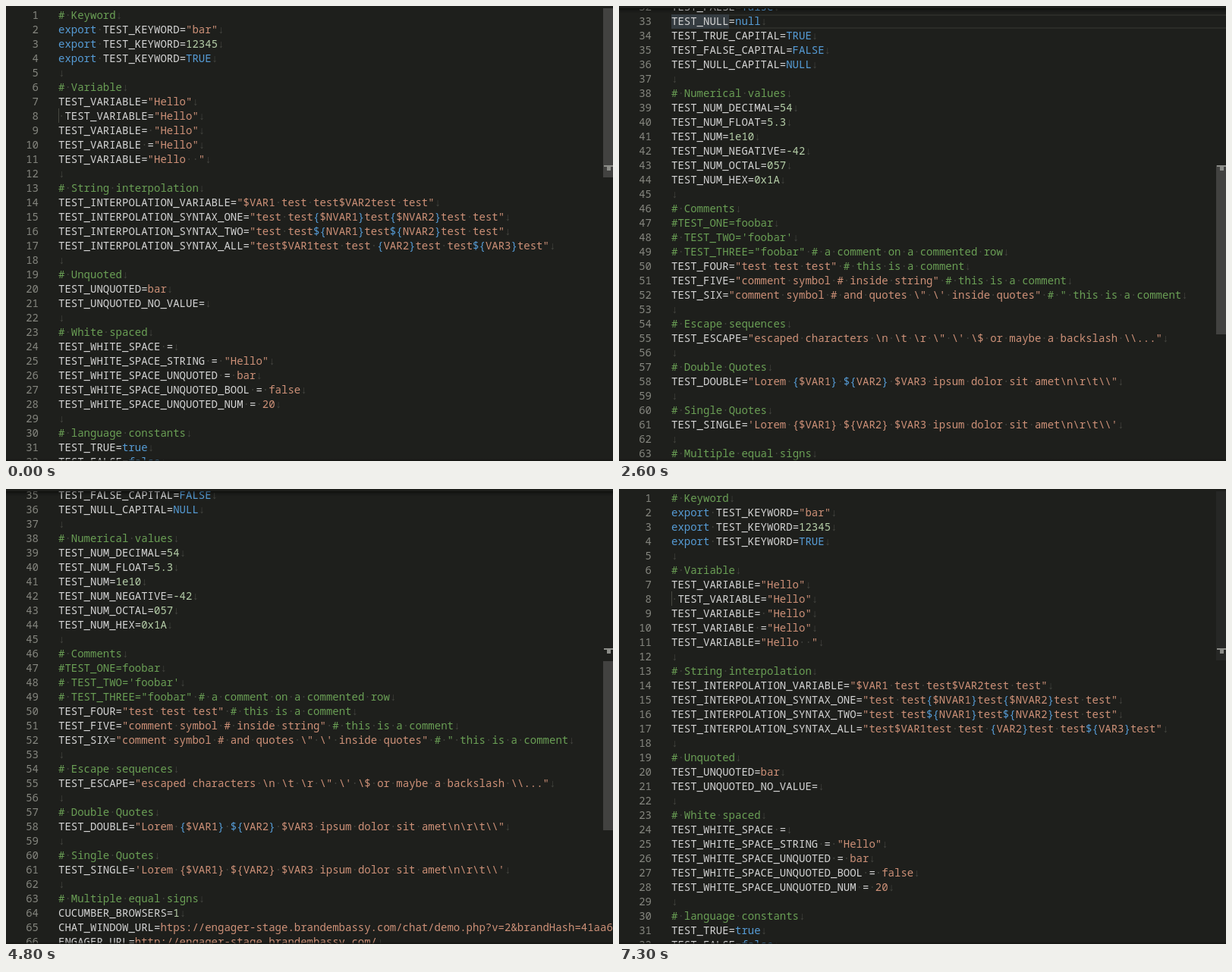
These frames come from a looping animation (800 by 600 pixels, 8 s). An HTML page:

```html
<!DOCTYPE html>
<html lang="en">
<head>
<meta charset="utf-8">
<title>Syntax highlighting</title>
<style>
  html, body { margin: 0; width: 100%; height: 100%; overflow: hidden; background: #1e1f1c; }
  #editor {
    position: absolute; left: 0; top: 3px; width: 800px; height: 597px; overflow: hidden;
    font: 14px/17px "Noto Sans Mono", monospace; font-variant-ligatures: none; color: #d4d4d4;
  }
  #lines { will-change: transform; }
  .line { position: relative; height: 19px; padding-left: 69px; white-space: pre; }
  .number { position: absolute; left: 0; width: 43px; text-align: right; color: #85867f; }
  .space { color: #42433e; }
  .eol { color: #454641; }
  .keyword { color: #569cd6; }
  .comment { color: #6a9f55; }
  .string { color: #ce9178; }
  .numeric { color: #b5cea8; }
  .link { text-decoration: underline; text-underline-offset: 3px; }
  .active::before {
    content: ""; position: absolute; left: 69px; right: 0; top: 0; height: 15px;
    border: solid #2b2c28; border-width: 2px 0;
  }
  .active .word { position: relative; display: inline-block; height: 19px; background: #353c41; }
  .guide { box-shadow: inset 1px 0 #464741; }
  #shadow { position: absolute; left: 0; right: 0; top: 0; height: 6px; box-shadow: inset 0 6px 6px -6px #000; }
  #thumb { position: absolute; left: 787px; top: 0; width: 13px; height: 223px; background: rgba(121, 121, 121, .4); }
  .mark { position: absolute; background: #8b8c87; }
  #bottom { position: absolute; left: 0; right: 0; bottom: 0; height: 3px; background: linear-gradient(transparent, #151613); }
</style>
</head>
<body>
<div id="editor">
  <div id="lines"></div>
  <div id="shadow"></div>
  <div id="thumb"></div>
  <div class="mark" style="left:788px;top:207px;width:12px;height:2px"></div>
  <div class="mark" style="left:792px;top:209px;width:5px;height:5px"></div>
  <div id="bottom"></div>
</div>
<script type="text/plain" id="code">
# Keyword
export TEST_KEYWORD="bar"
export TEST_KEYWORD=12345
export TEST_KEYWORD=TRUE

# Variable
TEST_VARIABLE="Hello"
 TEST_VARIABLE="Hello"
TEST_VARIABLE= "Hello"
TEST_VARIABLE ="Hello"
TEST_VARIABLE="Hello  "

# String interpolation
TEST_INTERPOLATION_VARIABLE="$VAR1 test test$VAR2test test"
TEST_INTERPOLATION_SYNTAX_ONE="test test{$NVAR1}test{$NVAR2}test test"
TEST_INTERPOLATION_SYNTAX_TWO="test test${NVAR1}test${NVAR2}test test"
TEST_INTERPOLATION_SYNTAX_ALL="test$VAR1test test {VAR2}test test${VAR3}test"

# Unquoted
TEST_UNQUOTED=bar
TEST_UNQUOTED_NO_VALUE=

# White spaced
TEST_WHITE_SPACE =
TEST_WHITE_SPACE_STRING = "Hello"
TEST_WHITE_SPACE_UNQUOTED = bar
TEST_WHITE_SPACE_UNQUOTED_BOOL = false
TEST_WHITE_SPACE_UNQUOTED_NUM = 20

# language constants
TEST_TRUE=true
TEST_FALSE=false
TEST_NULL=null
TEST_TRUE_CAPITAL=TRUE
TEST_FALSE_CAPITAL=FALSE
TEST_NULL_CAPITAL=NULL

# Numerical values
TEST_NUM_DECIMAL=54
TEST_NUM_FLOAT=5.3
TEST_NUM=1e10
TEST_NUM_NEGATIVE=-42
TEST_NUM_OCTAL=057
TEST_NUM_HEX=0x1A

# Comments
#TEST_ONE=foobar
# TEST_TWO='foobar'
# TEST_THREE="foobar" # a comment on a commented row
TEST_FOUR="test test test" # this is a comment
TEST_FIVE="comment symbol # inside string" # this is a comment
TEST_SIX="comment symbol # and quotes \" \' inside quotes" # " this is a comment

# Escape sequences
TEST_ESCAPE="escaped characters \n \t \r \" \' \$ or maybe a backslash \\..."

# Double Quotes
TEST_DOUBLE="Lorem {$VAR1} ${VAR2} $VAR3 ipsum dolor sit amet\n\r\t\\"

# Single Quotes
TEST_SINGLE='Lorem {$VAR1} ${VAR2} $VAR3 ipsum dolor sit amet\n\r\t\\'

# Multiple equal signs
CUCUMBER_BROWSERS=1
CHAT_WINDOW_URL=htps://engager-stage.brandembassy.com/chat/demo.php?v=2&brandHash=41aa6
ENGAGER_URL=http://engager-stage.brandembassy.com/
</script>
<script>
const LOOP = 8000;
const $ = id => document.getElementById(id);

// [time in ms, scroll offset in px]
const scrolls = [
  [0, 0], [900, 50], [1400, 100], [1500, 150], [1600, 200], [1900, 250], [2000, 350],
  [2400, 400], [2500, 500], [2600, 600], [3000, 700], [3500, 750], [3600, 850], [3700, 950],
  [4300, 850], [4400, 750], [4800, 650], [4900, 600], [5200, 550], [5300, 450],
  [5500, 400], [5600, 300], [5800, 250], [6000, 200], [6100, 100], [6200, 50], [6300, 0]
];

function add(parent, kind, text) {
  const span = document.createElement("span");
  span.className = kind;
  for (const part of text.split(/( )/)) {
    if (part === " ") add(span, "space", "·");
    else span.append(part);
  }
  parent.append(span);
}

function addString(row, text) {
  for (const part of text.split(/(\$?\{|\})/)) {
    add(row, /^(\$?\{|\})$/.test(part) ? "keyword" : "string", part);
  }
}

function highlight(row, line) {
  if (line.startsWith("#")) return add(row, "comment", line);
  const [, keyword, name, assign, value] = line.match(/^(export)?( *\w+)( ?= ?)(.*)$/);
  if (keyword) add(row, "keyword", keyword);
  add(row, "word", name);
  add(row, "", assign);
  const quoted = value.match(/^("(?:\\.|[^"\\])*")(.*)$/);
  if (quoted) {
    addString(row, quoted[1]);
    add(row, "comment", quoted[2]);
  } else if (assign === "=" && /^(true|false|null)$/i.test(value)) add(row, "keyword", value);
  else if (assign === "=" && /^-?\d[\w.]*$/.test(value)) add(row, "numeric", value);
  else add(row, value.startsWith("http:") ? "string link" : "string", value);
}

const source = $("code").textContent.slice(1).split("\n");
source.forEach((line, i) => {
  const row = document.createElement("div");
  row.className = "line";
  if (line === "TEST_NULL=null") row.classList.add("active");
  add(row, "number", String(i + 1));
  if (line.startsWith(" ")) {
    add(row, "guide", " ");
    line = line.slice(1);
  }
  if (line) highlight(row, line);
  if (i < source.length - 1) add(row, "eol", "↓");
  $("lines").append(row);
});

function draw(now) {
  const time = now % LOOP;
  const scroll = scrolls.findLast(([start]) => start <= time)[1];
  const fade = Math.min(1, Math.max(0, (time - 6700) / 600));
  $("lines").style.transform = `translateY(${-scroll}px)`;
  $("thumb").style.transform = `translateY(${Math.round(scroll * 0.345)}px)`;
  $("thumb").style.opacity = 1 - 0.75 * fade;
  $("shadow").style.display = scroll ? "block" : "none";
  requestAnimationFrame(draw);
}
requestAnimationFrame(draw);
</script>
</body>
</html>
```
